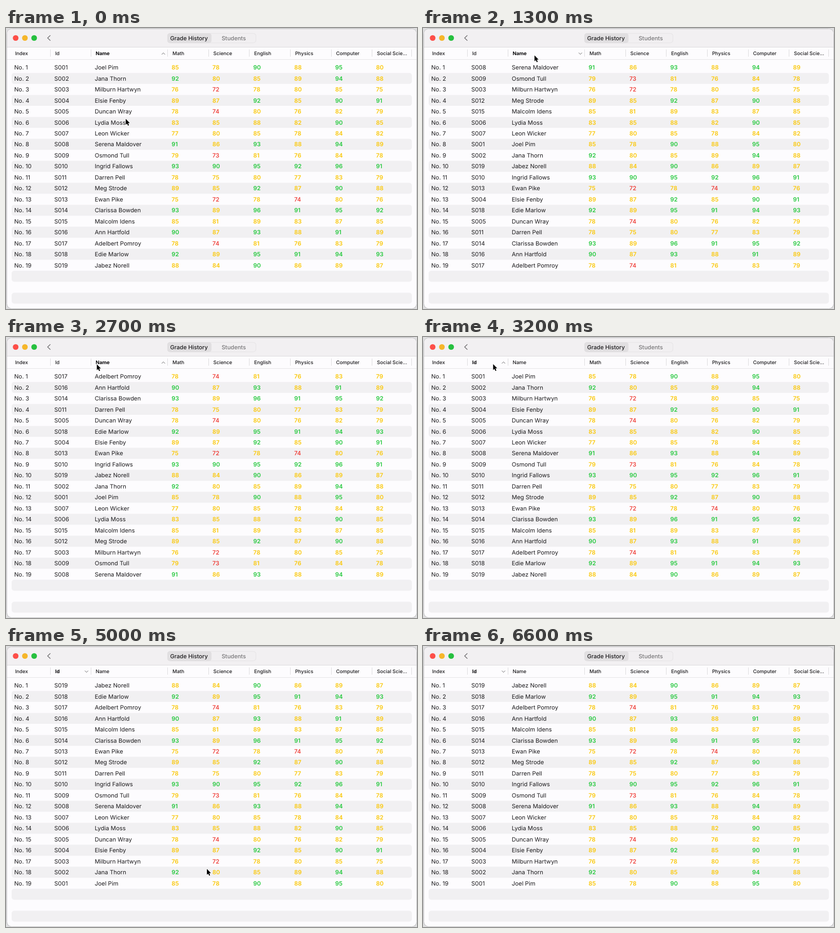
An HTML page that plays this animation: 800x549 px, repeating every 6.7 s.

```html
<!DOCTYPE html>
<html lang="en">
<head>
<meta charset="utf-8">
<title>Grade History</title>
<style>
  html, body { margin: 0; width: 100%; height: 100%; overflow: hidden; background: #dededf; }
  svg { display: block; width: 800px; height: 549px; }
  text { font: 400 11.4px Inter, Roboto, sans-serif; fill: #1c1b1d; text-rendering: geometricPrecision; }
  .head { font-size: 9.6px; font-weight: 500; }
  .sorted { font-weight: 700; fill: #0c0b0d; }
  .tab { font-size: 11.1px; font-weight: 500; }
  .high { fill: #27c93f; font-weight: 600; }
  .mid { fill: #fac80a; font-weight: 600; }
  .low { fill: #ee2f28; font-weight: 500; }
</style>
</head>
<body>
<svg id="stage" viewBox="0 0 800 549"></svg>
<script>
const LOOP = 6700, STEP = 100, ROW = 21.47, FIRST = 77;
const HEADS = ['Index', 'Id', 'Name', 'Math', 'Science', 'English', 'Physics', 'Computer', 'Social Scie...'];
const LEFT = [16, 94, 172.7, 322.2, 401.8, 481.3, 561, 640.8, 720.3];
const ID = 1, NAME = 2;

const students = `Joel Pim,85 78 90 88 95 80
Jana Thorn,92 80 85 89 94 88
Milburn Hartwyn,76 72 78 80 85 75
Elsie Fenby,89 87 92 85 90 91
Duncan Wray,78 74 80 76 82 79
Lydia Moss,83 85 88 82 90 85
Leon Wicker,77 80 85 78 84 82
Serena Maldover,91 86 93 88 94 89
Osmond Tull,79 73 81 76 84 78
Ingrid Fallows,93 90 95 92 96 91
Darren Pell,78 75 80 77 83 79
Meg Strode,89 85 92 87 90 88
Ewan Pike,75 72 78 74 80 76
Clarissa Bowden,93 89 96 91 95 92
Malcolm Idens,85 81 89 83 87 85
Ann Hartfold,90 87 93 88 91 89
Adelbert Pomroy,78 74 81 76 83 79
Edie Marlow,92 89 95 91 94 93
Jabez Norell,88 84 90 86 89 87`.split('\n').map((line, i) => {
  const [name, scores] = line.split(',');
  return { id: 'S' + String(i + 1).padStart(3, '0'), name, scores: scores.split(' ') };
});

// [start, value]: the header reacts to a click just before the rows do
const headerStates = [[0, [NAME, 1]], [900, [NAME, -1]], [2200, [NAME, 1]], [3000, [ID, 1]], [4100, [ID, -1]]];
const rowStates = [[0, ['id', 1]], [1000, ['name', -1]], [2300, ['name', 1]], [3100, ['id', 1]], [4200, ['id', -1]]];
// [time, x, y]
const pointerPath = [[0, 232, 176], [100, 232, 176], [700, 216, 52], [2500, 216, 52], [2900, 135.5, 51.5],
  [4400, 135.5, 51.5], [5000, 390, 434], [5300, 440, 562]];

const stage = document.getElementById('stage');

function add(tag, attrs, parent = stage) {
  const el = document.createElementNS('http://www.w3.org/2000/svg', tag);
  for (const key in attrs) el.setAttribute(key, attrs[key]);
  parent.append(el);
  return el;
}
const box = (x, y, width, height, rx, fill, more) => add('rect', { x, y, width, height, rx, fill, ...more });
const line = (d, stroke, width) => add('path', { d, stroke, 'stroke-width': width, fill: 'none',
  'stroke-linecap': 'round', 'stroke-linejoin': 'round' });
function label(str, x, y, cls, parent) {
  const el = add('text', { x, y, class: cls || '' }, parent);
  el.textContent = str;
  return el;
}

// Window and toolbar
box(1.5, 1.5, 798, 547, 10, '#fdfcfe', { stroke: '#b9b8ba' });
add('path', { d: 'M2 37V12Q2 2 12 2H789Q799 2 799 12V37Z', fill: '#f2f0f2' });
box(2, 37, 797, 1, 0, '#dddbdd');
box(2, 61, 797, 1, 0, '#e5e4e6');
['#fd4e48', '#f6b62a', '#26c03f'].forEach((fill, i) => add('circle', { cx: 18.8 + 18 * i, cy: 19.5, r: 5.5, fill }));
line('M86 14.8L81 19.5L86 24.2', '#6c6b6d', 1.3);
box(314.5, 10.5, 172, 18.5, 5, '#f1eff1', { stroke: '#e6e4e6' });
box(314, 10, 86, 19.5, 5, '#e1dfe1');
label('Grade History', 319.5, 23.5, 'tab');
label('Students', 419.7, 23.5, 'tab').style.fill = '#777678';

// Header
const heads = HEADS.map((str, i) => label(str, LEFT[i] + 1.7, 52.9, 'head'));
[86, 165, 314, 394, 473, 553, 633, 712, 789].forEach(x => box(x, 42, 1, 14, 0, '#dddcde'));
const caret = line('', '#6a696b', 1);

// Stripes, fixed index column, movable rows
for (let i = 1; i < 22; i += 2) box(11, FIRST + ROW * i - 10.7, 779, 21.4, 5, '#f1f0f2');
const rowY = i => FIRST + 4.2 + ROW * i;
const grade = score => score >= 90 ? 'high' : score < 75 ? 'low' : 'mid';
students.forEach((s, i) => {
  label('No. ' + (i + 1), LEFT[0], rowY(i));
  s.row = add('g', {});
  label(s.id, LEFT[ID], 0, '', s.row);
  label(s.name, LEFT[NAME], 0, '', s.row);
  s.scores.forEach((score, k) => label(score, LEFT[3 + k], 0, grade(score), s.row));
});

const pointer = add('path', { d: 'M1 1.5V13L3.6 10.7L5.4 14.8L7.4 13.9L5.6 9.8H9Z', fill: '#000',
  stroke: '#fff', 'stroke-width': 1.8, 'paint-order': 'stroke', 'stroke-linejoin': 'round' });

const stateAt = (states, t) => states.filter(s => s[0] <= t).pop()[1];

function pointerAt(t) {
  const next = pointerPath.findIndex(p => p[0] > t);
  if (next < 0) return null;
  const [t0, x0, y0] = pointerPath[next - 1], [t1, x1, y1] = pointerPath[next];
  const u = (t - t0) / (t1 - t0), e = u * u * (3 - 2 * u);
  return [x0 + (x1 - x0) * e, y0 + (y1 - y0) * e];
}

function draw(t) {
  const [col, up] = stateAt(headerStates, t);
  heads.forEach((h, i) => h.classList.toggle('sorted', i === col));
  const x = col === NAME ? 306.3 : 156.7, dy = 1.5 * up;
  caret.setAttribute('d', `M${x - 3} ${50 + dy}L${x} ${50 - dy}L${x + 3} ${50 + dy}`);

  const [key, dir] = stateAt(rowStates, t);
  [...students].sort((a, b) => a[key] < b[key] ? -dir : dir)
    .forEach((s, i) => s.row.setAttribute('transform', `translate(0 ${rowY(i)})`));

  const at = pointerAt(t);
  pointer.setAttribute('visibility', at ? 'visible' : 'hidden');
  if (at) pointer.setAttribute('transform', `translate(${at})`);
}

const start = performance.now();
function tick() {
  const t = (performance.now() - start) % LOOP;
  draw(Math.floor(t / STEP) * STEP);
  requestAnimationFrame(tick);
}
tick();
</script>
</body>
</html>
```
